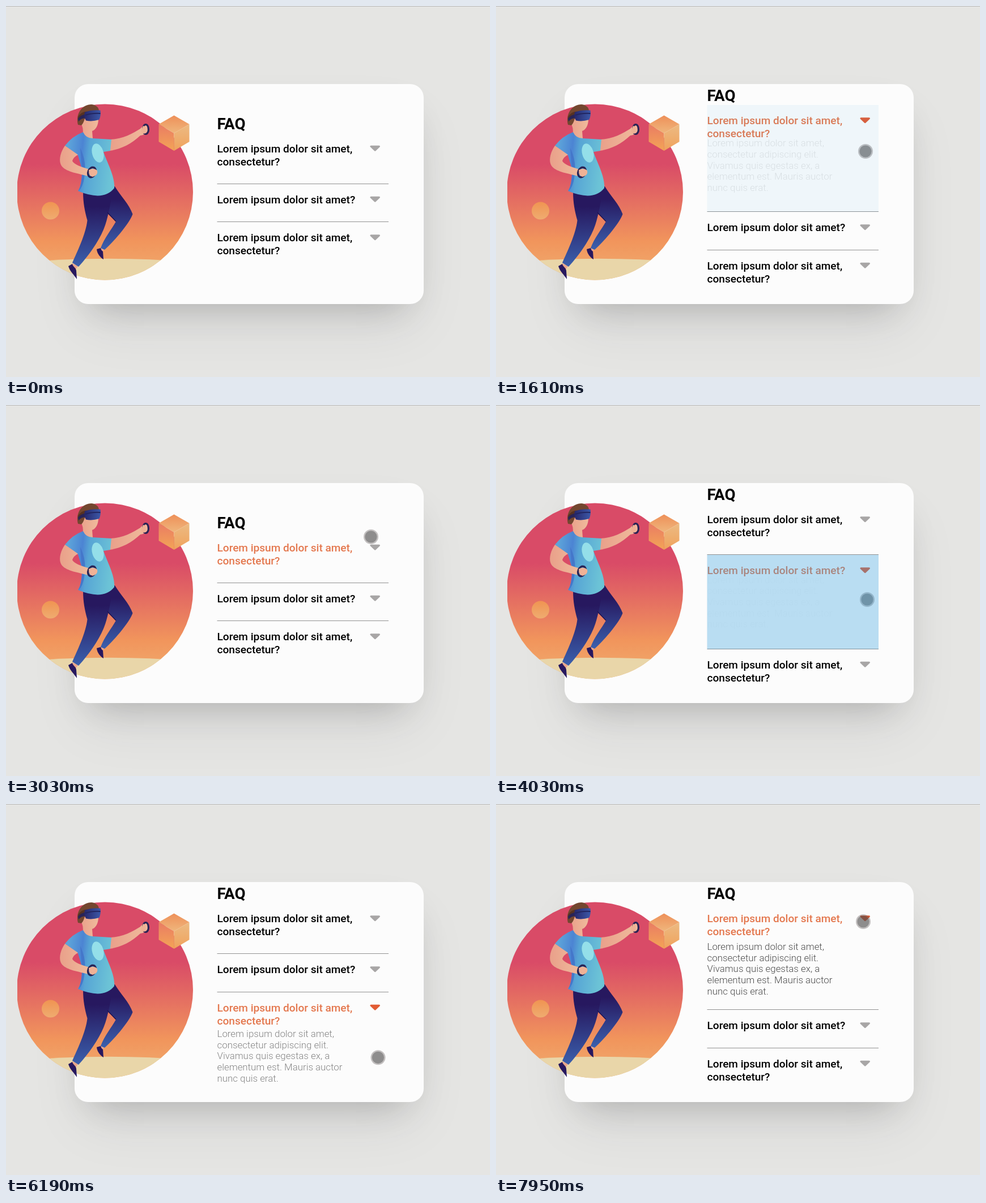
An HTML page for the animation above (8000 ms loop, 854 by 656 pixels).

```html
<!DOCTYPE html>
<html lang="en">
<head>
<meta charset="utf-8">
<title>FAQ accordion</title>
<style>
  html, body { margin: 0; width: 100%; height: 100%; overflow: hidden; background: #e5e5e3; }
  body { position: relative; font-family: Roboto, sans-serif; }
  .edge { position: absolute; top: 0; width: 854px; height: 1px; background: #b9b9b8; }
  .card {
    position: absolute; left: 121px; top: 137.5px; width: 616px; height: 389px;
    border-radius: 24px; background: #fcfcfc;
    box-shadow: 0 50px 100px -20px rgba(50, 50, 60, .1), 0 30px 60px -30px rgba(0, 0, 0, .22);
  }
  svg { position: absolute; left: 0; top: 0; }
  .title { font-size: 27.7px; font-weight: 700; }
  .question { font-size: 19.05px; font-weight: 500; }
  .answer { font-size: 16.85px; font-weight: 300; }
  .rule { stroke: #929292; stroke-width: 1; }
  .arrow { stroke-width: 3; stroke-linejoin: round; }
</style>
</head>
<body>
<div class="edge"></div>
<div class="card"></div>
<svg width="854" height="656" viewBox="0 0 854 656">
  <defs>
    <linearGradient id="sky" x1="0" y1="0" x2="0" y2="1">
      <stop offset=".34" stop-color="#d94b67"/>
      <stop offset=".78" stop-color="#f1955c"/>
      <stop offset="1" stop-color="#f0ad70"/>
    </linearGradient>
    <linearGradient id="sun" x1="0" y1="0" x2="0" y2="1">
      <stop stop-color="#f09452"/><stop offset="1" stop-color="#efac70"/>
    </linearGradient>
    <linearGradient id="cubeLeft" x1="0" y1="0" x2="0" y2="1">
      <stop stop-color="#ea7c63"/><stop offset="1" stop-color="#f3a456"/>
    </linearGradient>
    <linearGradient id="cubeTop" x1="0" y1="0" x2="0" y2="1">
      <stop stop-color="#ee9059"/><stop offset="1" stop-color="#efb67c"/>
    </linearGradient>
    <linearGradient id="cubeRight" x1="0" y1="0" x2="0" y2="1">
      <stop stop-color="#ecbb83"/><stop offset="1" stop-color="#f0a25c"/>
    </linearGradient>
    <linearGradient id="shirt" x1="0" y1="0" x2="1" y2=".15">
      <stop offset=".1" stop-color="#5da4d9"/><stop offset=".38" stop-color="#4c84d3"/>
      <stop offset=".52" stop-color="#57a5d5"/><stop offset="1" stop-color="#6cc3d6"/>
    </linearGradient>
    <linearGradient id="legs" x1="0" y1="0" x2="0" y2="1">
      <stop offset=".2" stop-color="#27185f"/><stop offset="1" stop-color="#3b60ad"/>
    </linearGradient>
    <linearGradient id="skin" x1="0" y1="0" x2="1" y2="0">
      <stop stop-color="#e9a08a"/><stop offset="1" stop-color="#f0bb9c"/>
    </linearGradient>
    <linearGradient id="visor" x1="0" y1="0" x2="1" y2="0">
      <stop stop-color="#27286c"/><stop offset="1" stop-color="#3c58a8"/>
    </linearGradient>
    <clipPath id="disc"><circle cx="174.5" cy="329" r="155.5"/></clipPath>
    <clipPath id="stage"><path d="M20 160H340V500H20Z"/></clipPath>
  </defs>

  <g clip-path="url(#stage)">
    <circle cx="174.5" cy="329" r="155.5" fill="url(#sky)"/>
    <path clip-path="url(#disc)" d="M20 454Q174 440 330 453V490H20Z" fill="#e9d6a9"/>
    <circle cx="78.5" cy="362" r="15.5" fill="url(#sun)"/>
  </g>

  <path d="M296.5 193.5L323.5 209L296.5 225L269.5 209Z" fill="url(#cubeTop)"/>
  <path d="M269.5 209L296.5 225V256L269.5 240Z" fill="url(#cubeLeft)"/>
  <path d="M323.5 209L296.5 225V256L323.5 240Z" fill="url(#cubeRight)"/>

  <g>
    <path d="M117 455L127 460L123 466L116 461ZM166 428L174 430L170 435L165 433Z" fill="#eaa68c"/>
    <path d="M110 460L117 456C118 461 123 462 124 468L125 483C120 475 113 470 110 460Z" fill="#27185f"/>
    <path d="M160 430L167 428Q168 432 171 434L172 448C167 445 161 439 160 430Z" fill="#27185f"/>
    <path d="M150 330L192 319C203 337 217 350 223.5 368C219 382 194 413 174 431L167 428C173 411 187 394 194 381L176 364Z" fill="url(#legs)"/>
    <path d="M136 328C136 348 139 363 143.5 379C141 403 125 436 117 454L128 461C150 437 166 411 173 393C179 378 184 352 188 328Z" fill="url(#legs)"/>
    <path d="M179 365L194 381" stroke="#211452" stroke-width="1.5"/>

    <path d="M184 236C207 235 224 225 237 217Q243 209 249 212L250 221Q245 228 237 229C222 243 204 253 183 256Z" fill="url(#skin)"/>
    <ellipse cx="246.5" cy="218" rx="5" ry="8.5" fill="none" stroke="#292456" stroke-width="3.2"/>
    <path d="M242 212Q248 212 246 225Q240 227 238 221Z" fill="#edb094"/>

    <path d="M131 204L142 198L163 200C163 210 159 219 152 221L153 234Q145 238 135 227Q138 216 131 206Z" fill="url(#skin)"/>
    <path d="M127 210C123 193 131 178 146 174.5C155 172 165 178 164 187L145 188C139 191 140 204 133 211Z" fill="#74462f"/>
    <path d="M127 196Q134 185 145 187L142 191Q134 191 128 201Z" fill="#573221"/>
    <path d="M127 199Q133 192 141 191V198Q133 198 128 204Z" fill="#292456"/>
    <path d="M139 187.5Q152 183 166.5 184.5Q168 193 164.5 201Q152 205 141 202.5Q137 196 139 187.5Z" fill="url(#visor)"/>
    <path d="M140 193Q152 189 166.5 190" fill="none" stroke="#222660" stroke-width="2"/>

    <path d="M136 223Q141 234 153 234L186 236L184 256L172 258C179 278 193 303 191 322Q172 346 127 327Q135 315 134 288L127 264L104 247Q117 230 136 223Z" fill="url(#shirt)"/>
    <path d="M131 251Q143 275 138 303Q136 320 128 327Q135 311 134 288Z" fill="#4477ca"/>
    <ellipse cx="162" cy="260" rx="10" ry="17" transform="rotate(-15 162 260)" fill="#94dfe9"/>

    <path d="M104 247C95 260 92 276 99 284C108 294 128 296 145 301L149 289C132 285 120 280 117 274Q119 267 127 263Z" fill="url(#skin)"/>
    <ellipse cx="151.5" cy="294" rx="6.5" ry="9" transform="rotate(22 151.5 294)" fill="none" stroke="#292456" stroke-width="3.5"/>
    <path d="M146 290Q155 285 161 291Q163 299 153 302Q146 301 146 290Z" fill="#efb296"/>
  </g>

  <g id="panel"><text class="title" x="372.5"></text></g>
  <g id="cursor">
    <circle r="13" fill="rgba(90,80,80,.35)"/>
    <circle r="10.6" fill="rgba(75,75,75,.44)"/>
  </g>
  <rect id="flash" x="372.5" width="302.5" fill="#319ede"/>
</svg>

<script>
const LOOP = 8000, LEFT = 372.5, ANSWER_HEIGHT = 99;
const LONG = ['Lorem ipsum dolor sit amet,', 'consectetur?'];
const SHORT = ['Lorem ipsum dolor sit amet?'];
const ANSWER = ['Lorem ipsum dolor sit amet,', 'consectetur adipiscing elit.',
  'Vivamus quis egestas ex, a', 'elementum est. Mauris auctor', 'nunc quis erat.'];

// [time, tapped item, open item or -1]
const TAPS = [[1480, 0, 0], [2500, 0, -1], [3960, 1, 1], [5880, 2, 2], [7510, 0, 0]];

// [time, x, y]
const PATH = [
  [121, 828, 655], [300, 770, 520], [560, 690, 350], [860, 655, 272],
  [930, 655, 270], [1340, 652, 257], [1660, 652, 257], [2220, 647, 222], [2500, 646, 220],
  [3030, 644, 233], [3600, 657, 352], [3890, 655, 345], [4030, 655, 344],
  [4780, 652, 348], [5320, 652, 348], [5620, 672, 415], [5860, 657, 462],
  [6130, 657, 462], [6870, 651, 296], [7200, 648, 220], [7450, 648, 209], [7950, 648, 208]
];

// Intervals in which the picture stands still
const HOLDS = [[0, 120], [860, 930], [1340, 1480], [3030, 3100], [4030, 4170],
  [4780, 4920], [4920, 5060], [5060, 5320], [6040, 6130]];

const panel = document.getElementById('panel');
const cursor = document.getElementById('cursor');
const flash = document.getElementById('flash');
const title = panel.querySelector('.title');
title.textContent = 'FAQ';

function set(el, attrs) {
  for (const key in attrs) el.setAttribute(key, attrs[key]);
  return el;
}
function add(parent, tag, attrs) {
  const el = document.createElementNS('http://www.w3.org/2000/svg', tag);
  return parent.appendChild(set(el, attrs));
}
function addLines(parent, lines, className, y, step) {
  const group = add(parent, 'g', { class: className });
  lines.forEach((line, i) => {
    add(group, 'text', { x: LEFT, y: y + i * step }).textContent = line;
  });
  return group;
}

const items = [LONG, SHORT, LONG].map((lines, i) => {
  const root = add(panel, 'g', {});
  const extra = (lines.length - 1) * 22.5;
  const question = addLines(root, lines, 'question', 34.8, 22.7);
  const arrow = add(root, 'path', { class: 'arrow', d: 'M643.9 24H658.5L651.2 31Z' });
  const answer = addLines(root, ANSWER, 'answer', 65.6 + extra, 19.7);
  const rule = i < 2 && add(panel, 'line', { class: 'rule', x1: LEFT, x2: 675 });
  return { root, question, arrow, answer, rule, height: 67.5 + extra };
});

function ease(x) {
  let lo = 0, hi = 1;
  for (let i = 0; i < 24; i++) {
    const u = (lo + hi) / 2;
    if (.75 * u * (1 - u) + u ** 3 < x) lo = u; else hi = u;
  }
  return .3 * lo * (1 - lo) ** 2 + 3 * lo * lo * (1 - lo) + lo ** 3;
}
const clamp = v => Math.max(0, Math.min(1, v));

function cursorAt(t) {
  const next = PATH.findIndex(p => p[0] > t);
  if (next < 0) return PATH[PATH.length - 1];
  const a = PATH[Math.max(0, next - 1)], b = PATH[next];
  const k = clamp((t - a[0]) / (b[0] - a[0] || 1));
  return a.map((v, i) => v + (b[i] - v) * k);
}

function flashAlpha(age) {
  if (age < 70) return .4 - .001 * age;
  return Math.max(0, .33 - (age - 70) * .0044);
}

function draw(time) {
  const hold = HOLDS.find(([from, to]) => time >= from && time < to);
  const t = hold ? hold[0] : time;
  const tap = TAPS.filter(([at]) => at <= t).pop() || [-LOOP, -1, -1];
  const [at, active, open] = tap;
  const shift = open < 0 ? 0 : -ANSWER_HEIGHT / 2;
  const shown = ease(clamp((t - at - 30) / 1000));

  set(title, { y: 217.9 + shift });
  set(flash, { opacity: flashAlpha(t - at) });

  let top = 224.2 + shift;
  items.forEach((item, i) => {
    const isOpen = i === open;
    const height = item.height + (isOpen ? ANSWER_HEIGHT : 0);
    set(item.root, { transform: `translate(0 ${top})` });
    set(item.question, { fill: i === active ? '#e4784f' : '#000' });
    const tint = isOpen ? '#e25c34' : '#a8a6a6';
    set(item.arrow, { fill: tint, stroke: tint });
    set(item.answer, { opacity: isOpen ? shown : 0, transform: `translate(0 ${-16 * (1 - shown)})` });
    if (i === active) set(flash, { y: Math.round(top), height });
    top += height;
    if (item.rule) {
      const y = Math.floor(top) + .5;
      set(item.rule, { y1: y, y2: y });
    }
  });

  const [, x, y] = cursorAt(t);
  set(cursor, { transform: `translate(${x} ${y})`, opacity: t > 120 ? 1 : 0 });
}

const start = performance.now();
function tick() {
  draw((performance.now() - start) % LOOP);
  requestAnimationFrame(tick);
}
tick();
</script>
</body>
</html>
```
